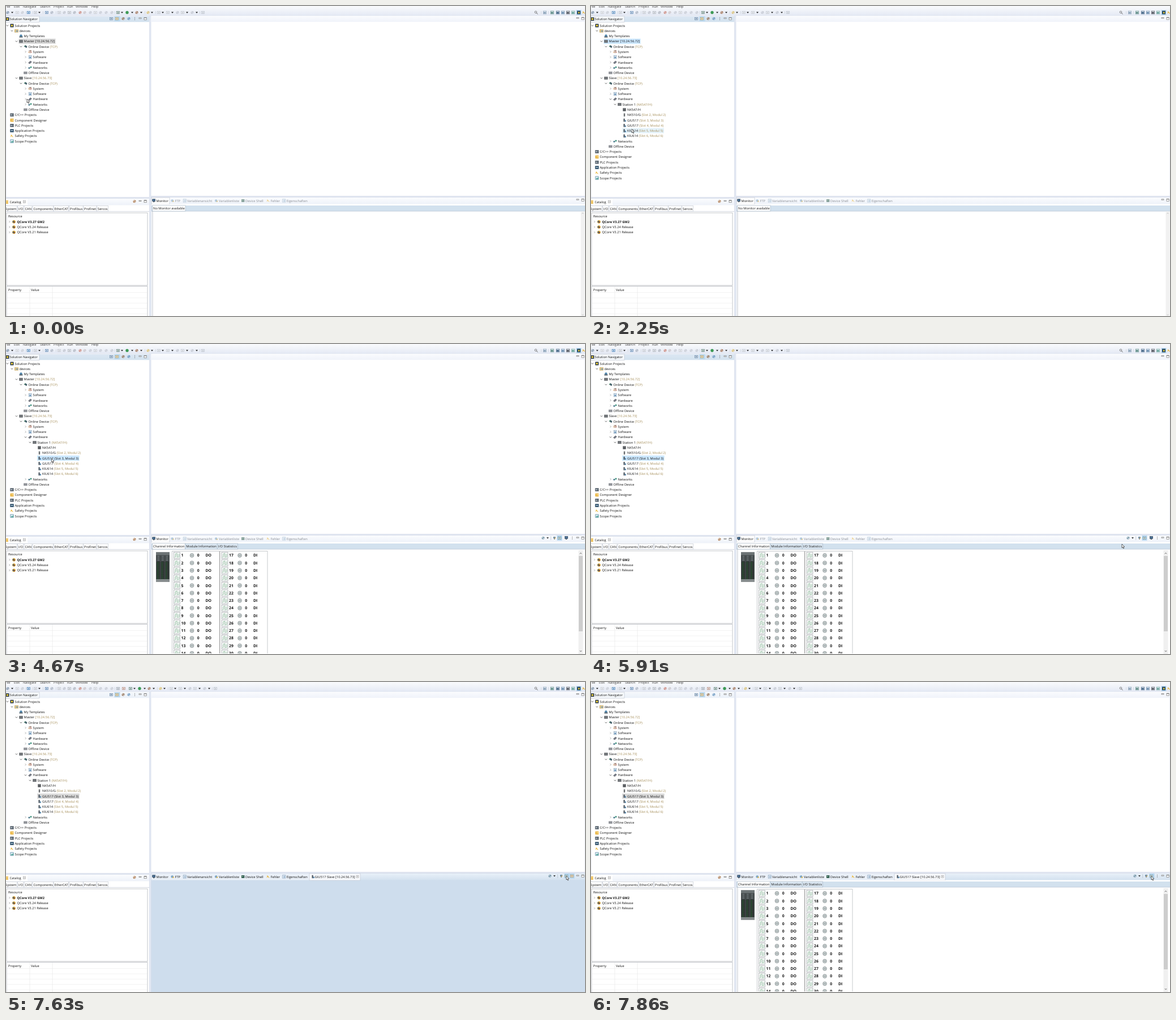
Write an HTML page with a canvas that moves like this. It is 1023 px wide and 547 px high and loops after 8000 ms.

```html
<!DOCTYPE html>
<html lang="en">
<head>
<meta charset="utf-8">
<title>Device monitor</title>
<style>
html, body { margin: 0; width: 100%; height: 100%; overflow: hidden; background: #e9eef7 }
canvas { display: block }
</style>
</head>
<body>
<canvas id="stage" width="1023" height="547"></canvas>
<script>
const c = document.getElementById('stage').getContext('2d');
c.textRendering = 'geometricPrecision';
const LOOP = 8000, ROW = 9.275;
const INK = '#141414', DIM = '#a48d58', GREY = '#8b8f96', BLUE = '#d2e1ee', LINE = '#c3c9d3', EDGE = '#d3d9e7';
const MASTER = '[10.24.56.72]', SLAVE = '[10.24.56.73]', MODULE = 'GIU517';
const FONT = '5.72px "Open Sans", sans-serif', BOLD = 'bold ' + FONT;
const BIG = 'bold 6.8px "Open Sans", sans-serif';

// Drawing helpers; text and icons are placed by their vertical middle.
function box(x, y, w, h, fill, stroke) {
  if (fill) { c.fillStyle = fill; c.fillRect(x, y, w, h); }
  if (stroke) { c.strokeStyle = stroke; c.lineWidth = .7; c.strokeRect(x, y, w, h); }
}
function path(points, stroke, width = .7, fill) {
  c.beginPath();
  for (let i = 0; i < points.length; i += 2) c.lineTo(points[i], points[i + 1]);
  if (fill) { c.closePath(); c.fillStyle = fill; c.fill(); }
  if (stroke) { c.strokeStyle = stroke; c.lineWidth = width; c.stroke(); }
}
function disc(x, y, r, fill, stroke) {
  c.beginPath(); c.arc(x, y, r, 0, 7);
  if (fill) { c.fillStyle = fill; c.fill(); }
  if (stroke) { c.strokeStyle = stroke; c.lineWidth = .7; c.stroke(); }
}
function text(s, x, y, color = INK, font = FONT) {
  c.font = font; c.fillStyle = color;
  c.fillText(s, x, y + 2.1);
  return x + c.measureText(s).width;
}
function shade(x, y, w, h, from, to) {
  const g = c.createLinearGradient(0, y, 0, y + h);
  g.addColorStop(0, from); g.addColorStop(1, to);
  box(x, y, w, h, g);
}
const drop = (x, y) => path([x - 2, y - 1, x + 2, y - 1, x, y + 1.2], null, 0, INK);
const dots = (x, y) => [-2, 0, 2].forEach(d => box(x - .5, y + d - .5, 1, 1, '#777'));
const close = (x, y) => { box(x - 2, y - 2, 4, 4, '#fff', '#aaa'); path([x - 1, y - 1, x + 1, y + 1], '#888'); path([x + 1, y - 1, x - 1, y + 1], '#888'); };
function minMax(x, y) {
  box(x - 2, y - 1.5, 4, 1.4, '#fff', '#777');
  box(x + 7, y - 2, 4.2, 4, '#fff', '#777');
  box(x + 7, y - 2, 4.2, 1, '#777');
}

const icons = {
  folder(x, y) { box(x - 3, y - 2, 6, 4.4, '#efd289', '#b89a58'); box(x - 1, y - .5, 3.5, 2, '#7599bd'); },
  root(x, y) { box(x - 3, y - 3, 6, 6, '#293644'); box(x - 1.5, y - 1.5, 3, 3, '#e9cc38'); },
  tmpl(x, y) { disc(x, y - .5, 2.3, '#4f86ad'); box(x - 3, y + .5, 6, 2, '#56646e'); },
  rack(x, y) { box(x - 3.2, y - 2.5, 6.4, 5, '#606468'); [-1.2, 1.2].forEach(d => box(x + d - .2, y - 2, .5, 4, '#a8adb0')); },
  online(x, y) { path([x - 3, y - .5, x, y - 2.5, x + 3, y, x + 2, y + 2.4, x - 1, y + 1], null, 0, '#45606b'); box(x - 2, y - 1.6, 1.5, 1.5, '#62a97d'); },
  system(x, y) { path([x - 2.5, y - 2, x + 2.5, y - 2, x, y - 2, x, y + 2.5], '#7a5140'); disc(x - 2, y + .5, 1, '#c8894e'); disc(x + 2, y + .5, 1, '#b05c49'); },
  soft(x, y) { box(x - 2, y - 2.7, 4.5, 5.4, '#e8eff6', '#7b9ab6'); box(x - 1, y - .5, 2.5, 2, '#4a7eaa'); },
  hard(x, y) { path([x - 3, y + 1, x + .5, y - 2.5, x + 3, y - .8, x - .5, y + 2.5], '#555', .5, '#747a88'); },
  net(x, y) { box(x - 3, y - .5, 3, 2.5, '#4c7b8e'); box(x, y - 2, 3, 2.5, '#4d9b87'); },
  offline(x, y) { box(x - 3.2, y - 2.2, 6.4, 4.4, '#84878d'); box(x - 1, y - 1.7, .6, 3.4, '#c0c3c7'); box(x + 1.2, y - 1.7, .6, 3.4, '#c0c3c7'); },
  cpu(x, y) { box(x - 2.7, y - 2.7, 5.4, 5.4, '#54585c'); box(x - 1.5, y - 1.5, 3, .6, '#999'); },
  slim(x, y) { box(x - 1.2, y - 2.7, 2.4, 5.4, '#6a6d70'); },
  module(x, y) { box(x - 1.5, y - 2.7, 2.2, 5.4, '#48525c'); box(x + .8, y, 2, 2.7, '#4f83aa'); },
  code(x, y) { box(x - 3.2, y - 2.7, 6.4, 5.4, '#4d5964'); box(x - 2, y - 1, 2, 2, '#ced7de'); box(x + .8, y - .4, 1.6, .8, '#ced7de'); },
  comp(x, y) { box(x - 3, y - 2.7, 6, 5.4, '#e9b33c'); box(x - 1, y - .7, 4, 1, '#fff4d5'); },
  app(x, y) { box(x - 3.2, y - 2.7, 6.4, 5.4, '#20435f'); box(x - 2, y - 1, 4, 1.6, '#b5cbda'); },
  safe(x, y) { path([x - 1.5, y - 2.5, x + 2.5, y + 2, x + 1, y + 2, x - .5, y, x - 2.5, y + 2.4], null, 0, '#e9b330'); },
  scope(x, y) { box(x - 2.7, y - 2.7, 5.4, 5.4, '#d9eaf1', '#5c8aa3'); path([x - 2, y + 2, x - 1, y, x + .5, y + .8, x + 2.3, y - 1.5, x + 2.3, y + 2], null, 0, '#3e9a8a'); },
  base(x, y) { disc(x, y, 2.8, '#d9a72f'); box(x - 2.2, y - 1.5, 2.4, 3, '#55606b'); box(x, y - .4, 2, 2.2, '#8a5138'); },
  mon(x, y) { box(x - 2.5, y - 2.7, 5, 3.8, '#4a6f94', '#33475a'); box(x - 1.2, y + 1.5, 2.4, 1.2, '#48545f'); },
  pin(x, y) { box(x - 2, y - 2.2, 4, 2.8, '#6e8ca8'); box(x - .8, y + .6, 1.6, 1.8, '#5d6870'); box(x, y - .6, 2.2, 1.6, '#d5b45e'); },
  ftp(x, y) { disc(x - .5, y, 2.3, '#7da6c6'); box(x, y, 2.5, 2.2, '#e0b652'); },
  list(x, y) { box(x - 2.5, y - 2.7, 5, 5.4, '#f4f7fa', '#7d9bb8'); box(x - 1.2, y - 1, 3, .7, '#4c7fad'); box(x - 1.2, y + .7, 3, .7, '#4c7fad'); },
  shell(x, y) { box(x - 2.7, y - 2.5, 5.4, 5, '#386255'); box(x - 1.6, y - 1, 2, 1, '#b3ddc3'); }
};

// depth, arrow (v open, > closed, - none), icon, label, dim label
const head = [
  [0, 'v', 'root', 'Solution Projects'], [1, 'v', 'folder', 'devices'],
  [2, '-', 'tmpl', 'My Templates'], [2, 'v', 'rack', 'Master', MASTER]
];
const parts = [[4, '>', 'system', 'System'], [4, '>', 'soft', 'Software'], [4, '>', 'hard', 'Hardware']];
const online = [3, 'v', 'online', 'Online Device', '(TCP)'];
const tail = [[4, '>', 'net', 'Networks'], [3, '-', 'offline', 'Offline Device']];
const modules = [
  [6, '-', 'cpu', 'NK547/H'], [6, '-', 'slim', 'NK510/G', '(Slot 2, Modul 2)'],
  ...[3, 4, 5, 6].map(n => [6, '-', 'module', n < 5 ? MODULE : 'KIU614', `(Slot ${n}, Modul ${n})`])
];
const foot = [
  ['code', 'C/C++ Projects'], ['comp', 'Component Designer'], ['code', 'PLC Projects'],
  ['app', 'Application Projects'], ['safe', 'Safety Projects'], ['scope', 'Scope Projects']
].map(([icon, label]) => [0, '-', icon, label]);

const HOVER = '#e5f3fb', PICKED = '#cce8ff', FADED = '#d9d9d9';

function arrow(kind, x, y) {
  if (kind == 'v') path([x - 1.7, y - .9, x, y + .9, x + 1.7, y - .9], '#444', .8);
  if (kind == '>') path([x - .8, y - 1.7, x + .9, y, x - .8, y + 1.7], '#999', .8);
}
function row([depth, open, icon, label, dim], y, fill) {
  const x = 15.5 + 8 * depth + (depth == 6 ? .5 : 0);
  const full = dim ? label + ' ' + dim : label;
  c.font = FONT;
  if (fill) box(x - 9, y - 4.7, c.measureText(full).width + 10.5, 9.2, fill);
  arrow(open, x - 13, y);
  icons[icon](x - 5, y);
  const end = text(label + ' ', x, y);
  if (dim) text(dim, end, y, fill && fill != HOVER ? INK : DIM);
}
function tree(t, mx, my) {
  const opened = t >= 70, full = t >= 1600;
  const hw = parts.map((p, i) => i == 2 && opened ? [4, 'v', ...p.slice(2)] : p);
  const list = [...head, online, ...parts, ...tail, [2, 'v', 'rack', 'Slave', SLAVE], online, ...hw];
  if (opened) list.push([5, t >= 1520 ? 'v' : '>', 'rack', 'Station 1', '(NK547/H)']);
  if (full) list.push(...modules);
  const split = list.length;
  list.push(...tail, ...foot);
  const gap = t >= 1520 && !full ? 34 : 0;
  list.forEach((r, i) => {
    const y = 34.5 + i * ROW + (i >= split ? gap : 0);
    const over = Math.abs(my - y) < ROW / 2 && mx < 132;
    let fill = null;
    if (i == 3 && t < 3420) fill = t < 70 ? FADED : PICKED;
    else if (i == 18 && t >= 3420) fill = t < 7220 ? PICKED : FADED;
    else if (over && (r[0] == 6 && t > 1900 || i == 14 && t > 470)) fill = HOVER;
    row(r, y, fill);
  });
}

// x, colour
const left = [[3, '#71879f'], [20, '#c4c8d0'], [29, '#c4c8d0'], [40, '#3b79b4'], [52, '#b8bdc6'], [72, '#557fae'], [81, '#a4adbb'],
  [94, '#b9bec8'], [103, '#b9bec8'], [112, '#a7adb7'], [121, '#a7adb7'], [131, '#c97b6d'],
  [139, '#c6bec2'], [149, '#c1c5ce'], [158, '#c1c5ce'], [167, '#c1c5ce'], [177, '#c1c5ce'], [187, '#c1c5ce']];
const moving = [[198, '#55796d'], [214, '#3d9a56'], [231, '#9a6443'], [251, '#d9ba61'], [270, '#bdc2cc'], [286, '#bdc2cc'],
  [303, '#bdc2cc'], [312, '#bdc2cc'], [329, '#bdc2cc'], [348, '#b2bac6']];
const right = [[952, '#8aa2b9'], [965, '#5d8b86'], [975, '#3f6183'], [984, '#6b8cae'], [993, '#50545e'], [1002, '#68a29b']];
function glyph([x, color], y = 11.5) {
  if (x % 2 < 1) { box(x - 2.4, y - 2, 4.8, 4, '#f7f9fc', color); box(x - 1.2, y - .8, 2.4, 1.8, color); }
  else { disc(x, y, 2.1, null, color); path([x - 2, y + 1.5, x + 2, y - 1.5], color, 1.2); }
}
function toolbar(shift) {
  shade(0, 0, 1023, 17, '#fafbfd', '#e4e9f4');
  const menu = { File: -1.5, Edit: 14, Navigate: 30, Search: 60, Project: 84, Run: 108, Window: 123, Help: 151 };
  for (const name in menu) text(name, menu[name], .9, '#444');
  [11, 59].forEach(x => drop(x, 11.5));
  left.forEach(i => glyph(i));
  if (shift) [[198, '#8f9aa8'], [208, '#b28272']].forEach(i => glyph(i));
  moving.forEach(([x, color]) => x == 214 ? disc(x + shift, 11.5, 2.7, color) : glyph([x + shift, color]));
  [205, 223, 239, 258, 277, 294, 320, 337].forEach(x => drop(x + shift, 11.5));
  [35, 46, 65, 88, 192, 245 + shift, 264 + shift, 342 + shift, 945, 958].forEach(x => box(x, 9, .6, 5, '#c5cbd7'));
  disc(936, 10.8, 1.8, null, '#555'); path([937.3, 12.2, 939.5, 14.3], '#555', 1);
  right.forEach(([x, color]) => { box(x - 2.7, 9, 5.4, 5, '#eef3f7', color); box(x - 2.2, 10.5, 4, 3, color); });
  box(1007.5, 7, 9, 9, '#b5d6f0'); box(1009, 8.5, 6, 6, '#24455a'); box(1011, 10.5, 2.5, 2.5, '#e9cc38');
  icons.safe(1021, 11.5);
}

function navigator(t, mx, my) {
  box(0, 17, 253.5, 320.5, '#fff', EDGE);
  shade(0, 18, 253, 10.2, t < 7390 ? '#dce7f3' : '#f5f8fc', t < 7390 ? BLUE : '#eaf0f8');
  box(0, 18, 59, 10.5, '#f6f9fc', LINE);
  icons.root(2.5, 23);
  text('Solution Navigator', 6.5, 23.3);
  box(191.5, 18, 10, 9, '#b9d8f0');
  [[186, '#56789b'], [196, '#b29650'], [207, '#8b6545'], [217, '#588bb8']].forEach(i => glyph(i, 22.3));
  dots(227.5, 22.3); minMax(237, 22.3);
  tree(t, mx, my);
}

function catalog() {
  box(0, 339.5, 253.5, 210, '#f8f9fb', EDGE);
  shade(0, 340, 253, 11, '#fbfcfe', '#eef2f9');
  box(0, 340, 38, 11.5, '#fff');
  icons.comp(1, 346); text('Catalog', 6.5, 346); close(32.5, 345.5);
  glyph([227, '#a66d3d'], 344.7); minMax(237, 344.7);
  box(0, 352, 253, 195, '#fff');
  const tabs = { System: -1, 'I/O': 22, CAN: 33.5, Components: 48.5, EtherCAT: 85.5, Profibus: 113, Profinet: 138, Sercos: 162 };
  path([0, 362.5, 253, 362.5], LINE);
  for (const name in tabs) {
    const end = text(name, tabs[name], 357.5);
    box(tabs[name] - 1.5, 352.5, end - tabs[name] + 2.5, 10, null, LINE);
  }
  box(1, 365, 249, 128, '#fff', '#a9adb3');
  text('Resource', 4, 371.2);
  ['QCore V3.27 GM2', 'QCore V3.24 Release', 'QCore V3.21 Release'].forEach((s, i) => {
    const y = 380.7 + i * 9.3;
    arrow('>', 6, y); icons.base(14, y);
    text(s, 19.5, y, INK, i ? FONT : BOLD);
  });
  box(1, 494.7, 249, 60, '#fff', '#a9adb3');
  text('Property', 4, 500.5); text('Value', 44, 500.5);
  for (let y = 505.5; y < 547; y += 9.4) path([2, y, 249, y], '#eeeeee');
  [42, 82].forEach(x => path([x, 495, x, 547], '#e8e8e8'));
}

function channels() {
  box(265, 367.5, 24, 52, '#454b4d');
  box(265, 367.5, 24, 5, '#6c7375'); box(265, 415, 24, 4.5, '#858b8c');
  for (let i = 0; i < 3; i++) {
    const x = 266.5 + i * 7.6;
    box(x, 384, 5.6, 31, '#1e2723');
    for (let y = 385; y < 414; y += 2.2) { box(x + 1, y, 1.2, 1.2, '#4c9558'); box(x + 3.5, y, 1, 1.2, '#6e7772'); }
    for (let y = 374; y < 383; y += 2.4) box(x + 1, y, 3.5, .9, '#798184');
  }
  c.save();
  c.beginPath(); c.rect(290, 364, 200, 182); c.clip();
  path([293.5, 546, 293.5, 365.5, 462, 365.5, 462, 546], '#aeb2b7');
  path([377.7, 366, 377.7, 546], '#777', .9);
  for (let i = 0; i < 14; i++) for (let k = 0; k < 2; k++) {
    const x = 296.5 + k * 84.5, y = 373 + i * 13.28;
    box(x, y - 5.6, 11, 11.2, '#fafcfb', '#9a9fa3');
    path([x, y, x + 11, y], '#d5dcd9'); path([x + 5.5, y - 5, x + 5.5, y + 5], '#d5dcd9');
    path([x + 1, y + 3, x + 3, y + 3, x + 3, y - 3, x + 6, y - 3, x + 6, y + 3, x + 9, y + 3, x + 9, y - 3], '#79b18b', .7);
    text(i + 1 + k * 16, x + 13, y + .3, '#111', BIG);
    disc(x + 32, y, 3.4, '#c9d1d1', '#7c8587'); box(x + 30, y - .4, 4, .9, '#858f90');
    text('0', x + 41.2, y + .3, '#111', BIG);
    text(k ? 'DI' : 'DO', x + 56, y + .3, '#111', BIG);
  }
  c.restore();
  box(1011.5, 364, 8, 183, '#f0f0f0'); box(1012, 374, 7, 133, '#cdcdcd');
  path([1013.8, 370.3, 1015.5, 368.5, 1017.2, 370.3], '#555', .9);
  path([1013.8, 541, 1015.5, 542.8, 1017.2, 541], '#555', .9);
}
function folder(names) {
  box(257, 350, 766, 197, '#fff');
  box(257, 352, 766, 10, BLUE);
  box(257, 361.7, 766, .7, '#b4c3d2');
  let x = 258.5;
  names.forEach((s, i) => {
    c.font = FONT;
    const w = c.measureText(s).width + 3;
    box(x, 352, w, 10, i ? '#dbe7f2' : '#fff', '#a9b8c7');
    text(s, x + 1.6, 357.3);
    x += w;
  });
  path([259, 362, 259, 547], '#a4adb8');
}

const views = [['mon', 'Monitor', 265.5], ['ftp', 'FTP', 298.5], ['list', 'Variablenansicht', 320], ['ftp', 'Variablenliste', 376],
  ['shell', 'Device Shell', 423], ['safe', 'Fehler', 467.5], ['list', 'Eigenschaften', 495.5]];
function monitor(t) {
  const tab = t >= 7630, empty = t >= 7390 && t < 7860, ready = t >= 4120;
  box(256.5, 337.5, 767, 210, empty ? '#cedded' : '#fff', EDGE);
  shade(257, 338, 766, 11.5, tab ? '#e8f0f8' : '#fbfcfe', tab ? '#d3e1ef' : '#eef2f9');
  if (tab) { box(257, 338, 279, 11.5, '#eaf0f8'); box(536, 338, 90, 12, '#f8fafd', LINE); }
  else box(257, 338, 32, 12, '#fff', LINE);
  views.forEach(([icon, label, x], i) => {
    c.globalAlpha = i && !tab ? .55 : 1;
    icons[icon](x - 4.3, 343.5);
    c.globalAlpha = 1;
    text(label, x, 343.7, i && !tab ? GREY : INK);
  });
  if (tab) {
    icons.module(542, 343.5);
    text(`${MODULE} Slave ${SLAVE}`, 545.5, 343.7);
    close(621, 343.3);
  }
  if (ready) {
    const d = tab ? 12 : 0, y = 342.3;
    const lit = tab ? (empty ? [991, 1000] : [991]) : t >= 7220 ? [978, 990] : [978];
    lit.forEach(x => box(x - 4.5, y - 4.5, 9, 9, '#b5d6f0'));
    glyph([949 + d, '#64879a'], y); drop(957 + d, y);
    box(962.5 + d, 339, .6, 7, '#aab5c2');
    icons.pin(969 + d, y); glyph([978 + d, '#668a8c'], y);
    if (!tab) icons.mon(990, y);
    if (tab && empty) glyph([1000, '#a98b54'], y); else dots(1000.5, y);
  }
  minMax(1010, 342.3);
  if (empty) return;
  if (ready) {
    folder(['Channel Information', 'Module Information', 'I/O Statistics']);
    channels();
  } else {
    folder(['No Monitor available']);
    box(1015.5, 362.5, 7, 185, '#f1f1f1');
    path([1017.4, 366.6, 1019, 365, 1020.6, 366.6], '#bbb', .8);
    path([1017.4, 544, 1019, 545.6, 1020.6, 544], '#bbb', .8);
  }
}

// time, x, y of the pointer tip
const route = [[0, 37, 164], [430, 37, 164], [1090, 44, 175], [1600, 44, 174.5], [2250, 72, 217], [2410, 74, 217.5], [2680, 74, 217.5],
  [3260, 77, 200], [3800, 77, 200], [4120, 79, 201.5], [4670, 79, 201.5], [5200, 780, 373], [5430, 852, 353], [5510, 858, 353],
  [5640, 858, 353], [5910, 938, 353], [6020, 938, 353], [6250, 923, 350], [6840, 990, 342], [8000, 990, 342.5]];
function pointer(t) {
  const i = route.findIndex(k => k[0] > t), [a, x, y] = route[i - 1], [b, u, v] = route[i];
  const f = (t - a) / (b - a);
  return [x + (u - x) * f, y + (v - y) * f];
}
const clicks = [[70, 320], [1520, 1680], [3800, 4050], [7220, 7390]];

function draw(now) {
  const t = now % LOOP, [mx, my] = pointer(t);
  box(0, 0, 1023, 547, '#e3e9f4');
  toolbar(t >= 7300 ? 22 : 0);
  box(256, 17, 767, 318.5, '#fff', EDGE);
  shade(256.5, 17.5, 767, 10.5, '#fafbfe', '#f0f3fa');
  minMax(1010, 22);
  navigator(t, mx, my);
  catalog();
  monitor(t);
  if (t >= 6840 && t < 7300) {
    box(965, 349.3, 60, 10.5, '#fff', '#8d8d8d');
    text('Open in new Monitor', 967.3, 354.6, '#666');
  }
  if (clicks.some(([a, b]) => t >= a && t < b)) disc(mx, my + .5, 6, 'rgba(246,228,72,.75)');
  path([0, 0, 0, 6.6, 1.5, 5.3, 2.6, 7.8, 3.7, 7.3, 2.6, 4.9, 4.7, 4.7, 0, 0].map((v, i) => v + (i % 2 ? my : mx)), '#222', .7, '#fff');
  requestAnimationFrame(draw);
}
requestAnimationFrame(draw);
</script>
</body>
</html>
```
